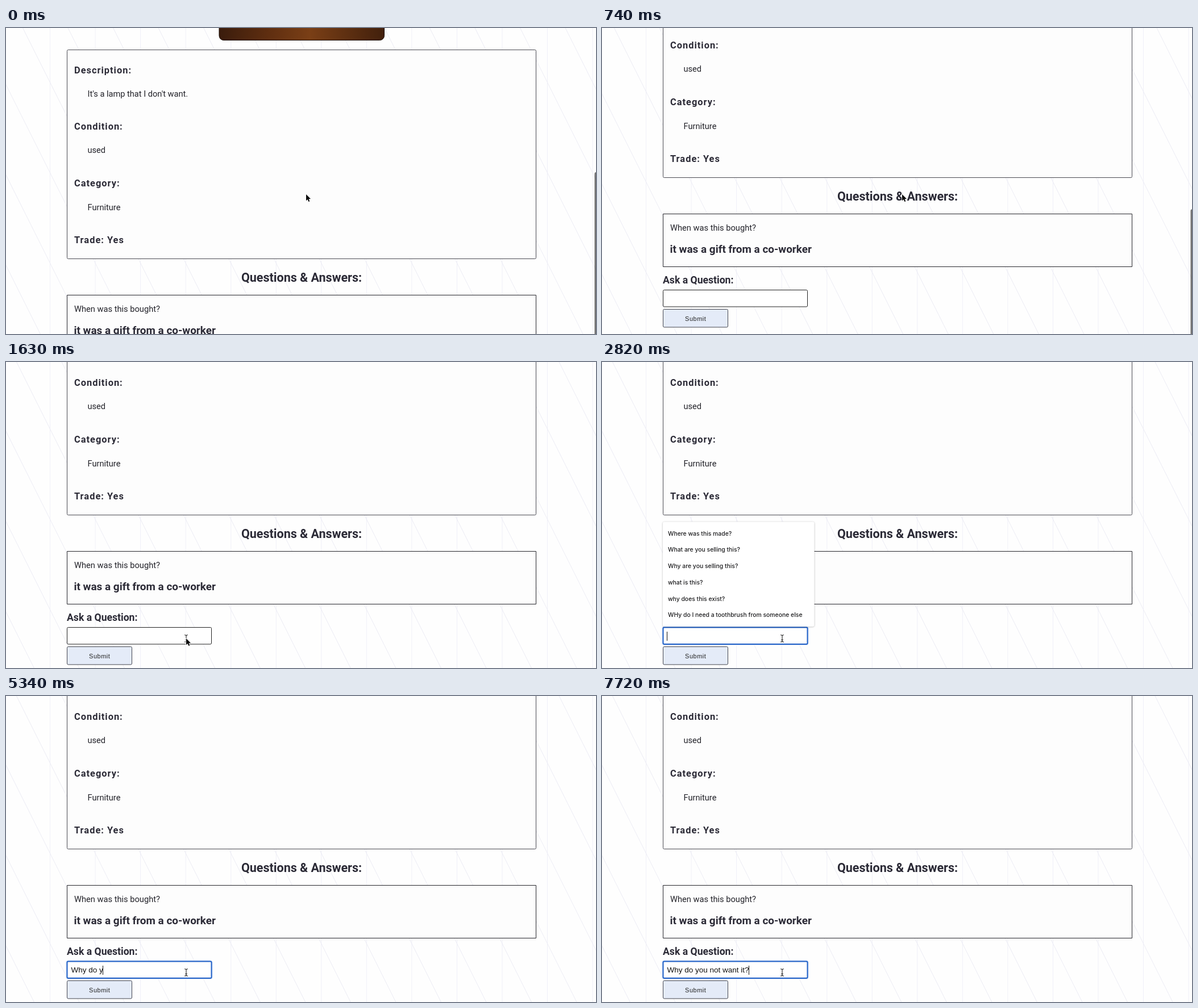
Recreate the animation shown at these times as an HTML page with a canvas. Size 1038 by 539 pixels, loop 8000 ms.

```html
<!DOCTYPE html>
<html lang="en">
<head>
<meta charset="utf-8">
<title>Ask a question</title>
<style>
html, body { margin: 0; width: 100%; height: 100%; overflow: hidden; background: #fefefe }
canvas { display: block }
</style>
</head>
<body>
<canvas id="stage" width="1038" height="539"></canvas>
<script>
const W = 1038, H = 539, LOOP = 8000;
const c = document.getElementById('stage').getContext('2d');
const ROBOTO = 'Roboto, sans-serif', ARIAL = '"Liberation Sans", Arial, sans-serif';
const INK = '#2b2a36', BODY = '#222229';

// Each track holds [start time, value] pairs; a value stays until the next one.
const scrollTrack = [[0, 0], [140, 48], [290, 103], [440, 146], [740, 143], [890, 141], [1040, 139], [1190, 138], [1340, 137]];
const barTrack = [[0, .55], [890, .45], [1040, .22], [1190, 0]];
const mouseTrack = [[0, [528, 293]], [1190, [505, 314]], [1340, [430, 384]], [1490, [346, 461]], [1630, [317, 487]]];
const typedTrack = [
  [0, ''], [3860, 'W'], [4160, 'Wh'], [4310, 'Why'], [4460, 'Why '],
  [4760, 'Why d'], [4910, 'Why do'], [5050, 'Why do '], [5340, 'Why do y'], [5490, 'Why do you'],
  [5790, 'Why do you '], [5940, 'Why do you n'], [6090, 'Why do you not'], [6230, 'Why do you not '],
  [6530, 'Why do you not w'], [6680, 'Why do you not wa'], [6830, 'Why do you not want'],
  [6970, 'Why do you not want '], [7120, 'Why do you not want i'],
  [7420, 'Why do you not want it'], [7720, 'Why do you not want it?']
];

const where = 'Where was this made?', what = 'What are you selling this?',
  selling = 'Why are you selling this?', whatIs = 'what is this?',
  exist = 'why does this exist?', brush = 'WHy do I need a toothbrush from someone else',
  legs = 'why does this only have three legs?';
const hintTrack = [
  [0, []], [2820, [where, what, selling, whatIs, exist, brush]],
  [3860, [where, what, whatIs, selling, brush, exist]],
  [4310, [selling, brush, exist, legs]], [4760, [brush, exist, legs]],
  [5050, [brush]], [5340, []]
];

function at(track, t) {
  let value;
  for (const [start, v] of track) if (t >= start) value = v;
  return value;
}

function text(str, x, y, font, color = INK, spacing = 0, align = 'left') {
  c.font = font;
  c.fillStyle = color;
  c.letterSpacing = spacing + 'px';
  c.textAlign = align;
  c.fillText(str, x, y);
}

function box(x, y, w, h, r, fill, stroke, line = 1) {
  c.beginPath();
  c.roundRect(x, y, w, h, r);
  c.fillStyle = fill;
  c.fill();
  if (!stroke) return;
  c.strokeStyle = stroke;
  c.lineWidth = line;
  c.stroke();
}

function background(scroll) {
  const gap = 79.55;
  c.lineWidth = 1;
  c.strokeStyle = '#f0f0f8';
  c.beginPath();
  for (let x = 77.5; x < W; x += gap) {
    c.moveTo(x, 0);
    c.lineTo(x, H);
  }
  c.stroke();
  c.strokeStyle = '#ececf4';
  c.beginPath();
  const shift = ((scroll - 100) / 2) % gap;
  for (let x = shift - 5 * gap; x < W + gap; x += gap) {
    c.moveTo(x, 0);
    c.lineTo(x + H / 2, H);
  }
  c.stroke();
}

function photo() {
  const wood = c.createLinearGradient(375, 0, 665, 0);
  wood.addColorStop(0, '#3a1c0c');
  wood.addColorStop(.3, '#5f2e10');
  wood.addColorStop(.55, '#7a3f16');
  wood.addColorStop(1, '#42200c');
  box(375, -190, 290.5, 211.5, 8, wood, '#1a0e08');
}

function details() {
  box(107.5, 38.5, 825, 368, 2, '#fdfdfd', '#4a4a52');
  const label = (str, y) => text(str, 120, y, '700 16.4px ' + ROBOTO, INK, 1);
  const value = (str, y) => text(str, 143.5, y, '14.6px ' + ROBOTO, BODY);
  label('Description:', 79.5);
  value("It's a lamp that I don't want.", 121);
  label('Condition:', 179);
  value('used', 220);
  label('Category:', 278.5);
  value('Furniture', 320.5);
  label('Trade: Yes', 378.5);
}

function questions() {
  text('Questions & Answers:', 520, 446.5, '700 21.5px ' + ROBOTO, INK, 0, 'center');
  box(107.5, 470.5, 825, 93, 0, '#fdfdfd', '#26262c');
  text('When was this bought?', 120, 499.5, '14.65px ' + ROBOTO, BODY);
  text('it was a gift from a co-worker', 119.5, 539, '700 18.9px ' + ROBOTO);
  text('Ask a Question:', 107, 593, '700 17.6px ' + ROBOTO);
}

function form(t, typed) {
  const focused = t >= 2820;
  if (focused) box(105.5, 602.5, 258, 33.5, 4, '#d3e2f8');
  box(107.5, 604.5, 254, 29.5, 2, '#fff', focused ? '#1f5fc6' : '#222', focused ? 2 : 1);
  box(107.5, 638.5, 114, 31.5, 2, '#e4ebf8', '#44464e');
  text('Submit', 164.7, 658.5, '11px ' + ARIAL, '#222', .5, 'center');
  if (!focused) return;
  text(typed, 114.5, 624, '13.5px ' + ARIAL, '#111');
  const caret = Math.round(114.5 + c.measureText(typed).width - .5);
  const hidden = t >= 3410 && t < 3860;
  if (!hidden) {
    c.fillStyle = '#111';
    c.fillRect(caret, 612, 1, 16);
  }
}

function suggestions(list) {
  if (!list.length) return;
  const row = 28.7, h = list.length * row + 12.3;
  const top = list.length > 1 ? 466 - h : 498;
  c.save();
  c.shadowColor = 'rgba(0,0,0,.3)';
  c.shadowBlur = 3;
  c.shadowOffsetY = .5;
  box(107, top, 266.5, h, 3, '#fff');
  c.restore();
  list.forEach((str, i) => text(str, 116, top + 24.2 + i * row, '500 10.4px Inter, sans-serif', '#1c1c1e'));
}

function arrow(x, y) {
  c.save();
  c.translate(x, y);
  c.beginPath();
  [[0, 0], [0, 11.3], [2.6, 9], [4.4, 13], [6.3, 12.2], [4.6, 8.3], [8, 8]].forEach(p => c.lineTo(...p));
  c.closePath();
  c.lineJoin = 'round';
  c.strokeStyle = '#fff';
  c.lineWidth = 1.6;
  c.stroke();
  c.fillStyle = '#0a0a0a';
  c.fill();
  c.restore();
}

function beam(x, y) {
  c.strokeStyle = '#222';
  c.lineWidth = 1.1;
  c.beginPath();
  for (const s of [-1, 1]) {
    c.moveTo(x - 3, y + s * 6.3);
    c.quadraticCurveTo(x, y + s * 6.3, x, y + s * 4.6);
    c.quadraticCurveTo(x, y + s * 6.3, x + 3, y + s * 6.3);
  }
  c.moveTo(x, y - 5);
  c.lineTo(x, y + 5);
  c.moveTo(x - 1.8, y + 2.5);
  c.lineTo(x + 1.8, y + 2.5);
  c.stroke();
}

function draw(t) {
  const scroll = at(scrollTrack, t);
  c.fillStyle = '#fefefe';
  c.fillRect(0, 0, W, H);
  background(scroll);

  c.save();
  c.translate(0, -scroll);
  photo();
  details();
  questions();
  form(t, at(typedTrack, t));
  c.restore();

  suggestions(at(hintTrack, t));
  const thumb = 254 + Math.min(scroll, 137) * .476;
  box(1035.5, thumb, 6, H, 3, `rgba(0,0,0,${at(barTrack, t)})`);
  const mouse = at(mouseTrack, t);
  if (t >= 1630) beam(317, 487);
  if (t < 1790) arrow(...mouse);
}

function frame(now) {
  draw(now % LOOP);
  requestAnimationFrame(frame);
}
requestAnimationFrame(frame);
</script>
</body>
</html>
```
